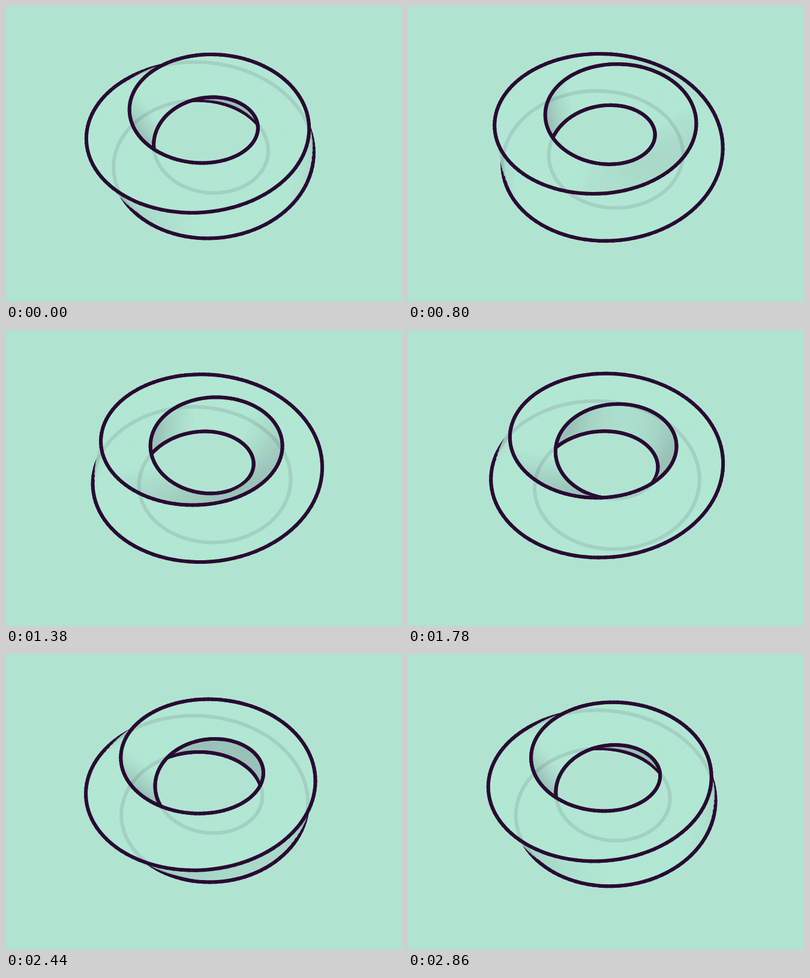
An HTML page with a canvas for the animation above (2880 ms loop, 660 by 495 pixels).

```html
<!DOCTYPE html>
<html lang="en">
<head>
<meta charset="utf-8">
<title>Twisted ring</title>
<style>
  html, body { margin: 0; width: 660px; height: 495px; overflow: hidden; background: #b0e4d1; }
  canvas { display: block; }
</style>
</head>
<body>
<canvas id="stage" width="660" height="495"></canvas>
<script>
const ctx = document.getElementById('stage').getContext('2d');
const { sin, cos, PI, min, max, round } = Math;

const LOOP = 2880;
const RADIUS = 135.8, SIZE = 54.4;            // ring radius, half diagonal of the square section
const TILT = 51.1 * PI / 180, DIST = 546, LIFT = -39.2;
const START = 44.6 * PI / 180;
const STEPS = 120, STRIPS = 6;                // slices per turn, strips across a face
const TURNS = 4 * STEPS;                      // the single edge closes after four turns
const BIAS = 22;                              // keeps a line in front of its own faces
const BACK = '#b0e4d1', INK = [42, 10, 51], FACE = [177, 231, 211];
const LIGHT = [0.58, 0.8];                    // towards the viewer, upwards
const inkColor = `rgb(${INK})`;

// u runs along the ring, w goes across one face from edge to edge
function project(u, w, spin) {
  const a = spin + u / 4;
  const r = RADIUS + SIZE * ((1 - w) * cos(a) - w * sin(a));
  const h = SIZE * ((1 - w) * sin(a) + w * cos(a));
  const front = r * cos(u);
  const y = LIFT + front * sin(TILT) - h * cos(TILT);
  const z = DIST - front * cos(TILT) - h * sin(TILT);
  return [330 + DIST * r * sin(u) / z, 247.5 + DIST * y / z, z];
}

function shade(u, spin) {
  const n = spin + u / 4 + PI / 4;
  const lit = LIGHT[0] * cos(n) * cos(u) + LIGHT[1] * sin(n);
  const k = 0.38 * min(0.45, max(0, 0.57 - lit));
  return `rgb(${FACE.map((c, i) => round(c + (INK[i] - c) * k))})`;
}

function trace(points) {
  ctx.beginPath();
  points.forEach(p => ctx.lineTo(p[0], p[1]));
}

function draw(time) {
  const spin = START + (time % LOOP) / LOOP * PI / 2;
  const grid = [];
  for (let i = 0; i <= TURNS; i++) {
    const u = i / STEPS * 2 * PI;
    grid.push(Array.from({ length: STRIPS + 1 }, (_, j) => project(u, j / STRIPS, spin)));
  }

  const items = [];
  for (let i = 0; i < TURNS; i++) {
    const color = shade((i + 0.5) / STEPS * 2 * PI, spin);
    const p = grid[i], q = grid[i + 1];
    items.push({ line: true, points: [p[0], q[0]], z: (p[0][2] + q[0][2]) / 2 - BIAS });
    for (let j = 0; j < STRIPS; j++) {
      const a = p[j], b = q[j], c = q[j + 1], d = p[j + 1];
      const area = (c[0] - a[0]) * (d[1] - b[1]) - (c[1] - a[1]) * (d[0] - b[0]);
      if (area < 0) items.push({ color, points: [a, b, c, d], z: (a[2] + b[2] + c[2] + d[2]) / 4 });
    }
  }
  items.sort((a, b) => b.z - a.z);

  ctx.fillStyle = BACK;
  ctx.fillRect(0, 0, 660, 495);
  ctx.lineCap = ctx.lineJoin = 'round';
  for (const { line, color, points } of items) {
    trace(points);
    ctx.lineWidth = line ? 6 : 1;
    ctx.strokeStyle = line ? inkColor : color;
    if (!line) {
      ctx.closePath();
      ctx.fillStyle = color;
      ctx.fill();
    }
    ctx.stroke();
  }

  // hidden parts of the edge shine through
  trace(grid.map(row => row[0]));
  ctx.globalAlpha = 0.1;
  ctx.lineWidth = 6;
  ctx.strokeStyle = inkColor;
  ctx.stroke();
  ctx.globalAlpha = 1;
}

const begin = performance.now();
function frame() {
  draw(performance.now() - begin);
  requestAnimationFrame(frame);
}
frame();
</script>
</body>
</html>
```
